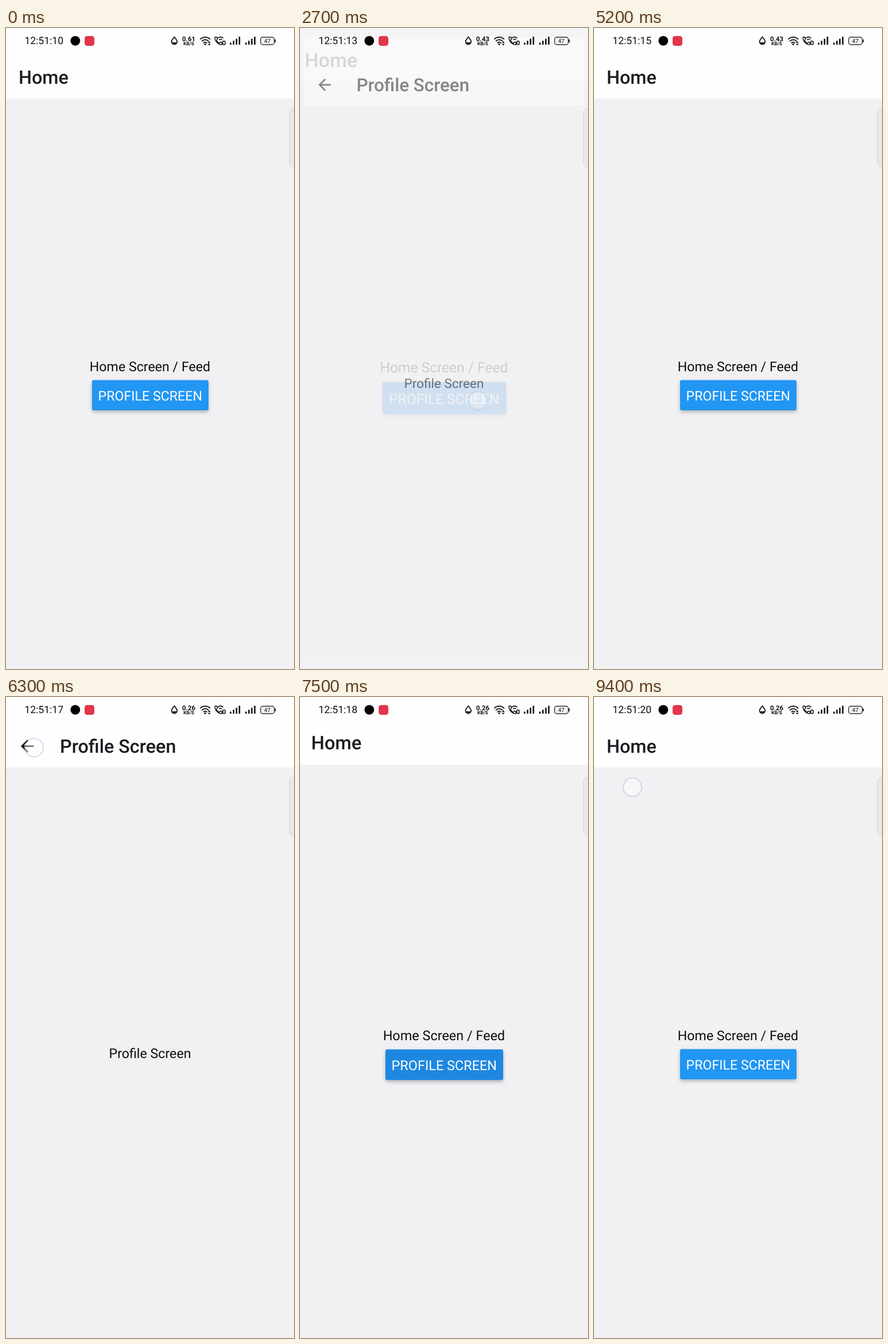
An HTML page for the animation above (9500 ms loop, 502 by 1115 pixels).

```html
<!DOCTYPE html>
<html lang="en">
<head>
<meta charset="utf-8">
<title>Screen navigation</title>
<style>
  html, body { margin: 0; width: 100%; height: 100%; overflow: hidden; background: #f1f0f3; }
  svg { display: block; width: 100%; height: 100%; }
  text { font-family: Roboto, "Noto Sans", sans-serif; text-rendering: geometricPrecision; fill: #0e0e10; }
  .title { font-size: 32.3px; font-weight: 500; fill: #1c1b1f; }
  .body { font-size: 23.2px; text-anchor: middle; }
  .label { fill: #fff; }
  .bar { fill: #fefdff; }
  #button { filter: drop-shadow(0 3px 3px rgba(0, 0, 0, .26)); }
  .line { fill: none; stroke: #111; stroke-width: 1.8; stroke-linecap: round; }
  .mid { text-anchor: middle; }
</style>
</head>
<body>
<svg viewBox="0 0 502 1115">
  <rect width="502" height="1115" fill="#f1f0f3"/>

  <g id="home">
    <rect width="502" height="1115" fill="#f1f0f3"/>
    <rect class="bar" width="502" height="122.5"/>
    <text class="title" x="22" y="96.5">Home</text>
    <text class="body" x="251" y="596.5">Home Screen / Feed</text>
    <rect id="button" x="150" y="612.5" width="203" height="52.5" rx="3"/>
    <text class="body label" x="251.3" y="648">PROFILE SCREEN</text>
  </g>

  <g id="profile">
    <rect width="502" height="1115" fill="#f1f0f3"/>
    <rect class="bar" width="502" height="122.5"/>
    <path transform="translate(20.2 68.7) scale(1.4)" fill="#1c1b1f"
      d="M20 11H7.83l5.59-5.59L12 4l-8 8 8 8 1.41-1.41L7.83 13H20z"/>
    <text class="title" x="94" y="96.5">Profile Screen</text>
    <text class="body" x="251" y="628">Profile Screen</text>
  </g>

  <rect x="494" y="139.5" width="20" height="102.5" rx="8" fill="#e9e8ea" stroke="#d3d3d6"/>

  <g id="status">
    <text id="clock" x="32.3" y="28.3" font-size="17.6"></text>
    <circle cx="120.8" cy="22.3" r="8.4" fill="#000"/>
    <rect x="137" y="14" width="17" height="17" rx="4.5" fill="#e2354b"/>
    <path class="line" stroke-width="1.6" d="M293.4 15.6c-2.6 3.2-4.8 5.6-4.8 8.2a4.8 4.8 0 0 0 9.6 0c0-2.6-2.2-5-4.8-8.2z"/>
    <path fill="#111" d="M289 25h8.800a4.800 4.400 0 0 1-8.800 0z"/>
    <text id="speed" class="mid" x="318.5" y="22.8" font-size="11.4" font-weight="600"></text>
    <text class="mid" x="318.5" y="30.3" font-size="8.2" font-weight="700">KB/S</text>
    <path class="line" d="M339 19.200a12 12 0 0 1 16.500 0M341.700 22.600a8 8 0 0 1 11 0M344.600 25.800a4 4 0 0 1 5.200 0"/>
    <circle cx="347.200" cy="28.300" r="1.600" fill="#111"/>
    <path fill="#111" d="M351.800 26l2.500-3 2.500 3zM351.800 27.500l2.500 3 2.500-3z"/>
    <path class="line" style="stroke-width:2" transform="translate(362 13.500) scale(.74)"
      d="M6.620 10.790c1.440 2.830 3.760 5.140 6.590 6.590l2.200-2.200c.3-.3.700-.4 1-.2l3 .6V20c0 .6-.4 1-1 1C10.600 21 3 13.400 3 4c0-.6.4-1 1-1h3.500l1.300 4.600-2.200 3.200z"/>
    <path class="line" style="stroke-width:1.500" d="M369.500 17.400a7 7 0 0 1 8.800 0M371.700 20.300a4 4 0 0 1 4.600 0"/>
    <rect x="378" y="22.800" width="4" height="6" rx="1" fill="none" stroke="#111" stroke-width="1.600"/>
    <rect x="443.700" y="16" width="24" height="13" rx="4" fill="#f1f0f2" stroke="#333" stroke-width="1.400"/>
    <path class="line" d="M469.300 20.800v3.200"/>
    <text class="mid" x="455.500" y="26" font-size="9.800">47</text>
  </g>

  <circle id="touch" r="16" fill="rgba(255,255,255,.45)" stroke="rgba(150,175,205,.4)" stroke-width="2"/>
</svg>

<script>
const LOOP = 9500, STEP = 100, SLIDE = 400;
const $ = id => document.getElementById(id);

// [start ms, opens the profile]
const moves = [[2590, 1], [4378, 0], [5600, 1], [6490, 0], [7452, 1], [8590, 0]];

// [start ms, end ms, x, y]
const taps = [
  [2300, 2800, 310, 648], [4100, 4400, 45, 89],
  [5300, 5600, 308, 657], [6300, 6500, 49, 88],
  [7200, 7500, 306, 650], [8200, 8600, 47, 88],
  [9200, 9600, 67, 157]
];

const speeds = [[0, '0.61'], [1700, '0.43'], [5700, '0.26']];

const ramp = (t, a, b) => Math.min(1, Math.max(0, (t - a) / (b - a)));
const bezier = (a, b, c, d, s) =>
  a * (1 - s) ** 3 + 3 * b * s * (1 - s) ** 2 + 3 * c * s * s * (1 - s) + d * s ** 3;
const latest = (list, t) => list.filter(e => e[0] <= t).pop();

// Fast out, extra slow in: two cubic segments joined at (1/6, 0.4).
function ease(x) {
  if (x <= 0 || x >= 1) return x <= 0 ? 0 : 1;
  const [px, py] = x < 1 / 6
    ? [[0, .05, .1333, 1 / 6], [0, 0, .06, .4]]
    : [[1 / 6, .2083, .25, 1], [.4, .82, 1, 1]];
  let lo = 0, hi = 1;
  for (let i = 0; i < 24; i++) {
    const mid = (lo + hi) / 2;
    if (bezier(...px, mid) < x) lo = mid; else hi = mid;
  }
  return bezier(...py, lo);
}

function place(id, scale, alpha) {
  const el = $(id);
  el.setAttribute('transform', `translate(251 557.5) scale(${scale}) translate(-251 -557.5)`);
  el.setAttribute('opacity', alpha);
  el.setAttribute('visibility', alpha > 0 ? 'visible' : 'hidden');
}

function drawScreens(t) {
  const [start, opening] = latest(moves, t) || [-LOOP, 0];
  const d = t - start, p = ease(d / SLIDE);
  if (opening) {
    place('home', 1 + .075 * p, 1 - ramp(d, 50, 136));
    place('profile', .85 + .15 * p, ramp(d, 50, 170));
  } else {
    place('home', 1.1 - .1 * p, ramp(d, 30, 120));
    place('profile', 1 - .15 * p, 1 - ramp(d, 50, 136));
  }
  const pressed = moves.some(([at, open]) => open && t >= at - 200 && t < at + 300);
  $('button').setAttribute('fill', pressed ? '#1e88e0' : '#2196f3');
}

function drawTouch(t) {
  const tap = taps.find(([a, b]) => t >= a && t < b);
  const el = $('touch');
  el.setAttribute('visibility', tap ? 'visible' : 'hidden');
  if (!tap) return;
  el.setAttribute('cx', tap[2]);
  el.setAttribute('cy', tap[3]);
  el.setAttribute('opacity', tap[1] - t <= STEP ? .6 : 1);
}

function drawStatus(t) {
  $('clock').textContent = '12:51:' + (10 + Math.floor((t + 700) / 1000));
  $('speed').textContent = latest(speeds, t)[1];
}

function addSignal(x) {
  for (let i = 0; i < 4; i++) {
    const h = 4 + 3.4 * i, bar = document.createElementNS('http://www.w3.org/2000/svg', 'rect');
    const box = { x: x + 5.1 * i, y: 29.3 - h, width: 2.6, height: h, rx: 1.2, fill: '#111' };
    for (const k in box) bar.setAttribute(k, box[k]);
    $('status').append(bar);
  }
}

function draw() {
  const t = Math.floor(performance.now() % LOOP / STEP) * STEP;
  drawScreens(t);
  drawTouch(t);
  drawStatus(t);
  requestAnimationFrame(draw);
}

addSignal(390.3);
addSignal(417);
draw();
</script>
</body>
</html>
```
